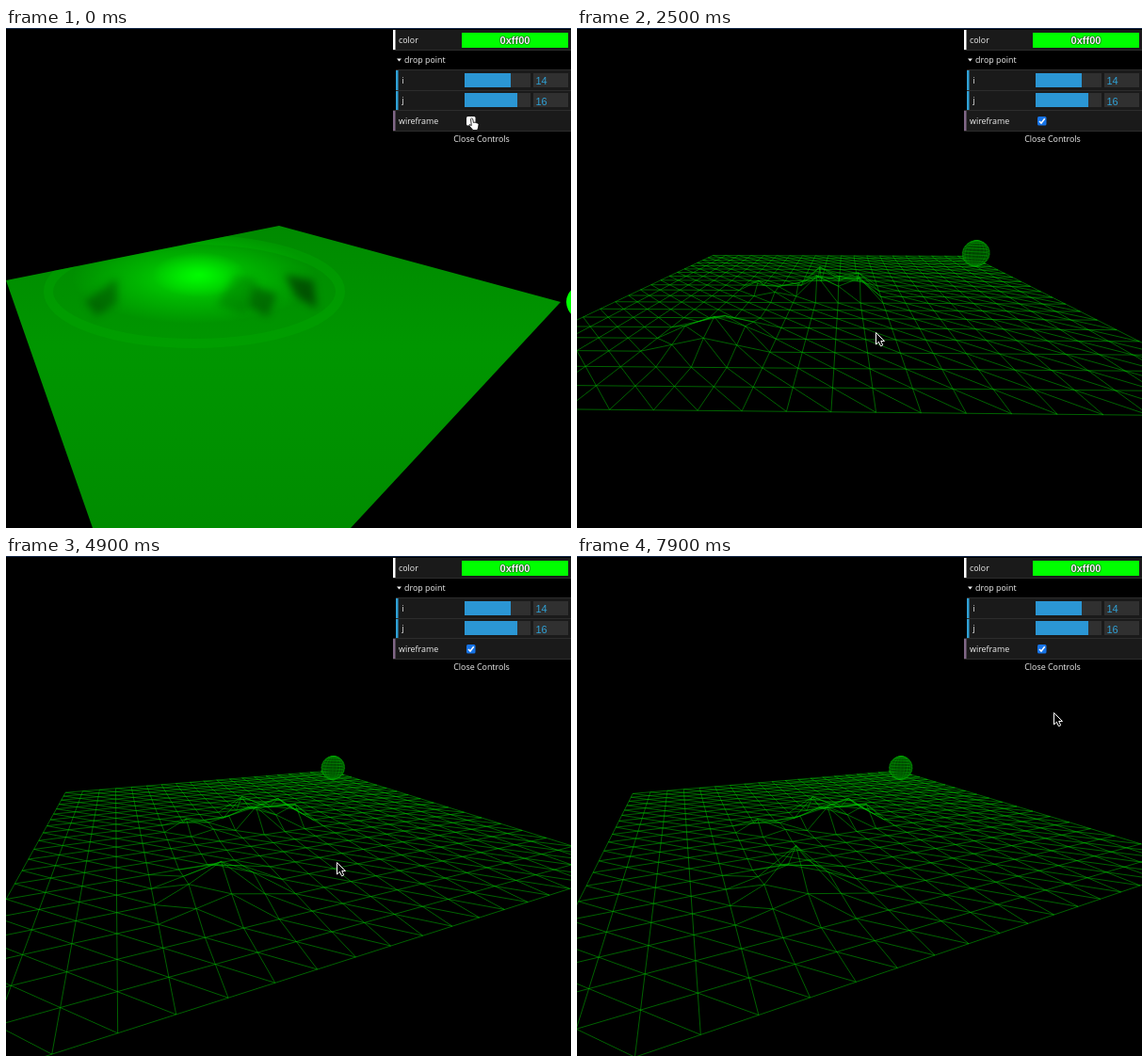
These frames come from a looping animation (600 by 531 pixels, 8000 ms). An HTML page with a canvas:

```html
<!DOCTYPE html>
<html>
<head>
<meta charset="utf-8">
<style>
  html, body { margin: 0; width: 600px; height: 531px; overflow: hidden; background: #000; }
  canvas, svg { position: absolute; left: 0; top: 0; }
  text { font: 8.9px "Open Sans", "Noto Sans", sans-serif; fill: #eee; }
  .num { font: 11px "Liberation Sans", Arial, sans-serif; fill: #2fa1d6; }
  .hex { font: bold 11px "Liberation Sans", Arial, sans-serif; fill: #fff; text-shadow: 0 0 2px #000, 0 0 1px #000; }
</style>
</head>
<body>
<canvas id="scene" width="600" height="531"></canvas>
<svg width="600" height="531" viewBox="0 0 600 531">
  <path d="M0 .5H600" stroke="#14294b"/>
  <path fill="#1a1a1a" d="M411 2h189v21H411zM414 45h186v21H414zM414 67h186v20H414zM411 88h189v21H411z"/>
  <path fill="none" stroke="#2c2c2c" d="M411 23.5H600M414 44.5H600M414 66.5H600M411 87.5H600M411 109.5H600"/>
  <path fill="#fff" d="M411 2h2.5v21H411z"/>
  <path fill="#2fa1d6" d="M414 45h2.5v21H414zM414 67h2.5v20H414z"/>
  <path fill="#806787" d="M411 88h2.5v21H411z"/>
  <path fill="#0f0" d="M484 5h113v16H484z"/>
  <path fill="#303030" d="M487 48h70v15h-70zM560 48h37v15h-37zM487 69h70v15h-70zM560 69h37v15h-37z"/>
  <path fill="#2b96d4" d="M487 48h49v15h-49zM487 69h56v15h-56z"/>
  <path fill="#eee" d="M415 32.500h5l-2.500 3z"/>
  <text x="417" y="16">color</text>
  <text class="hex" x="540.500" y="16.500" text-anchor="middle">0xff00</text>
  <text x="423" y="37">drop point</text>
  <text x="420.500" y="59">i</text>
  <text x="420.500" y="80">j</text>
  <text class="num" x="562.500" y="60">14</text>
  <text class="num" x="562.500" y="81.500">16</text>
  <text x="417" y="102">wireframe</text>
  <text x="505" y="121" text-anchor="middle">Close Controls</text>
  <rect id="box" x="489" y="94" width="9.500" height="9.500" rx="1.500"/>
  <path id="tick" d="M491 99l2 2 3.700-4.700" fill="none" stroke="#fff" stroke-width="1.500"/>
  <g id="cursor" stroke="#fff" stroke-linejoin="round">
    <path id="arrow" fill="#000" d="M0 0V12.500L2.900 9.800 5 14.300 7.200 13.300 5.200 9H9z"/>
    <path id="hand" fill="#fff" stroke="#000" stroke-width=".8" d="M0 1.200Q1.200-.5 2.200 1.200L3 5 4.500 4.600 6 5.200 7.500 5.500 8.500 7 8 10.500 7 13H2.500L-1.500 8.500-1.300 7 .8 8z"/>
  </g>
</svg>
<script>
const LOOP = 8000, WIRE_ON = 300, N = 20;
const $ = id => document.getElementById(id);
const ctx = $('scene').getContext('2d');

// Key rows: time, then values
const cameraKeys = [ // azimuth, elevation in degrees
  [0, 94.3, 23.8], [1200, 94.3, 23.8], [1700, 75.6, 19.2], [2500, 46, 15.7], [2800, 39, 16.5],
  [3500, 36.8, 17.5], [3700, 36, 17.6], [4500, 24.5, 18.2], [4900, 22.4, 18.3], [5200, 21.3, 18.2]];
const cursorKeys = [
  [0, 493, 95], [400, 493, 95], [1100, 251, 331], [1200, 251, 331], [1700, 277, 324], [2500, 317, 323],
  [3500, 330, 326], [3700, 331, 326], [4500, 348, 325], [4900, 351, 325], [5200, 352, 325],
  [5900, 358, 318], [6700, 430, 244], [7900, 506, 166]];
const dropKeys = [ // peak, ring around it
  [0, .12, .02], [1700, .153, .01], [2500, .078, .045], [3500, .082, .04],
  [4900, .1, .045], [6700, .103, .047], [7300, .103, .047], [7900, .151, .045]];
const bumps = [
  [6, 10, .05], [7, 10, .02], [7, 11, .02], [8, 10, .04], [9, 9, .1], [9, 10, .07], [9, 11, .1],
  [10, 9, .05], [10, 10, .06], [10, 11, .05], [11, 9, .07], [11, 10, .06], [11, 11, .09]];

function at(keys, t) {
  const i = keys.findIndex(k => k[0] > t);
  if (i < 0) return keys[keys.length - 1].slice(1);
  const a = keys[i - 1], b = keys[i], p = (t - a[0]) / (b[0] - a[0]);
  return a.slice(1).map((v, j) => v + (b[j + 1] - v) * p);
}

// Orbit camera around the plane centre; the plane spans -1..1
function makeCamera(azimuth, elevation) {
  const rad = Math.PI / 180, a = (azimuth - 45) * rad, e = elevation * rad;
  const ca = Math.cos(a), sa = Math.sin(a), ce = Math.cos(e), se = Math.sin(e);
  return (x, y, h) => {
    const right = x * ca - y * sa, away = -x * sa - y * ca;
    const scale = 212.6 / (1 + (away * ce - h * se) / 1.74);
    return [278 + right * scale, 279 - (away * se + h * ce) * scale];
  };
}

function trace(points) {
  points.forEach((p, i) => i ? ctx.lineTo(...p) : ctx.moveTo(...p));
}

function drawGrid(project, t) {
  const h = Array.from({ length: N + 1 }, () => Array(N + 1).fill(0));
  for (const [u, v, z] of bumps) h[u][v] = z;
  const [peak, ring] = at(dropKeys, t);
  for (let u = 5; u <= 7; u++)
    for (let v = 15; v <= 17; v++) {
      const d = Math.abs(u - 6) + Math.abs(v - 16);
      h[u][v] = d ? ring / (d > 1 ? 2 : 1) : peak;
    }
  const pts = h.map((col, u) => col.map((z, v) => project(u / 10 - 1, v / 10 - 1, z)));
  ctx.strokeStyle = 'rgba(0,200,0,.62)';
  ctx.lineWidth = .8;
  for (const [du, dv] of [[1, 0], [0, 1], [1, 1]]) {
    ctx.beginPath();
    for (let u = 0; u + du <= N; u++)
      for (let v = 0; v + dv <= N; v++) trace([pts[u][v], pts[u + du][v + dv]]);
    ctx.stroke();
  }
}

function drawBall(project) {
  const R = .1, C = 1.06;
  const point = (lat, lon) => project(C + R * Math.cos(lat) * Math.cos(lon),
    -C + R * Math.cos(lat) * Math.sin(lon), .012 + R * Math.sin(lat));
  const curve = f => Array.from({ length: 33 }, (_, i) => f(i / 32));
  ctx.strokeStyle = 'rgba(0,200,0,.5)';
  ctx.fillStyle = 'rgba(0,70,0,.35)';
  ctx.lineWidth = .6;
  const ringLine = f => {
    ctx.beginPath();
    trace(curve(f));
    ctx.fill();
    ctx.stroke();
  };
  for (let i = 0; i < 10; i++) ringLine(p => point(p * 2 * Math.PI, i * Math.PI / 10));
  for (let i = 1; i < 12; i++) ringLine(p => point(i * Math.PI / 12 - Math.PI / 2, p * 2 * Math.PI));
}

function glow(x, y, rx, ry, rgb, alpha) {
  ctx.save();
  ctx.translate(x, y);
  ctx.scale(rx, ry);
  const g = ctx.createRadialGradient(0, 0, 0, 0, 0, 1);
  g.addColorStop(0, `rgba(${rgb},${alpha})`);
  g.addColorStop(.5, `rgba(${rgb},${alpha * .45})`);
  g.addColorStop(1, `rgba(${rgb},0)`);
  ctx.fillStyle = g;
  ctx.fillRect(-1, -1, 2, 2);
  ctx.restore();
}

function drawSolid() {
  ctx.save();
  ctx.beginPath();
  trace([[0, 268], [290, 210], [589, 291], [366, 531], [92, 531]]);
  ctx.clip();
  const g = ctx.createLinearGradient(0, 210, 0, 531);
  g.addColorStop(0, '#008a00');
  g.addColorStop(.4, '#009600');
  g.addColorStop(1, '#008c00');
  ctx.fillStyle = g;
  ctx.fillRect(0, 200, 600, 331);
  ctx.strokeStyle = 'rgba(0,175,0,.3)';
  ctx.lineWidth = 10;
  ctx.beginPath();
  ctx.ellipse(200, 280, 155, 55, 0, 0, 7);
  ctx.stroke();
  glow(200, 266, 130, 48, '0,255,0', .7);
  glow(205, 262, 50, 24, '0,255,0', .9);
  ctx.filter = 'blur(4px)';
  const facets = [
    [.35, [118, 266], [84, 290], [96, 306], [118, 292]],
    [.2, [243, 262], [266, 266], [254, 304], [224, 294]],
    [.4, [262, 273], [288, 283], [278, 306], [257, 296]],
    [.55, [296, 262], [326, 268], [330, 298], [308, 285]]];
  for (const [alpha, ...corners] of facets) {
    ctx.fillStyle = `rgba(0,30,0,${alpha})`;
    ctx.beginPath();
    trace(corners);
    ctx.fill();
  }
  ctx.restore();
  ctx.fillStyle = '#0f0';
  ctx.beginPath();
  ctx.ellipse(623, 291, 28, 22, 0, 0, 7);
  ctx.fill();
}

function frame() {
  const t = performance.now() % LOOP, wire = t >= WIRE_ON;
  ctx.clearRect(0, 0, 600, 531);
  if (wire) {
    const project = makeCamera(...at(cameraKeys, t));
    drawGrid(project, t);
    drawBall(project);
  } else drawSolid();

  $('box').setAttribute('fill', wire ? '#1673e6' : '#fff');
  $('tick').style.display = wire ? '' : 'none';
  const [x, y] = at(cursorKeys, t), overBox = t < 450;
  $('cursor').setAttribute('transform', `translate(${x + .5} ${y + .5})`);
  $('hand').style.display = overBox ? '' : 'none';
  $('arrow').style.display = overBox ? 'none' : '';
  requestAnimationFrame(frame);
}
frame();
</script>
</body>
</html>
```
